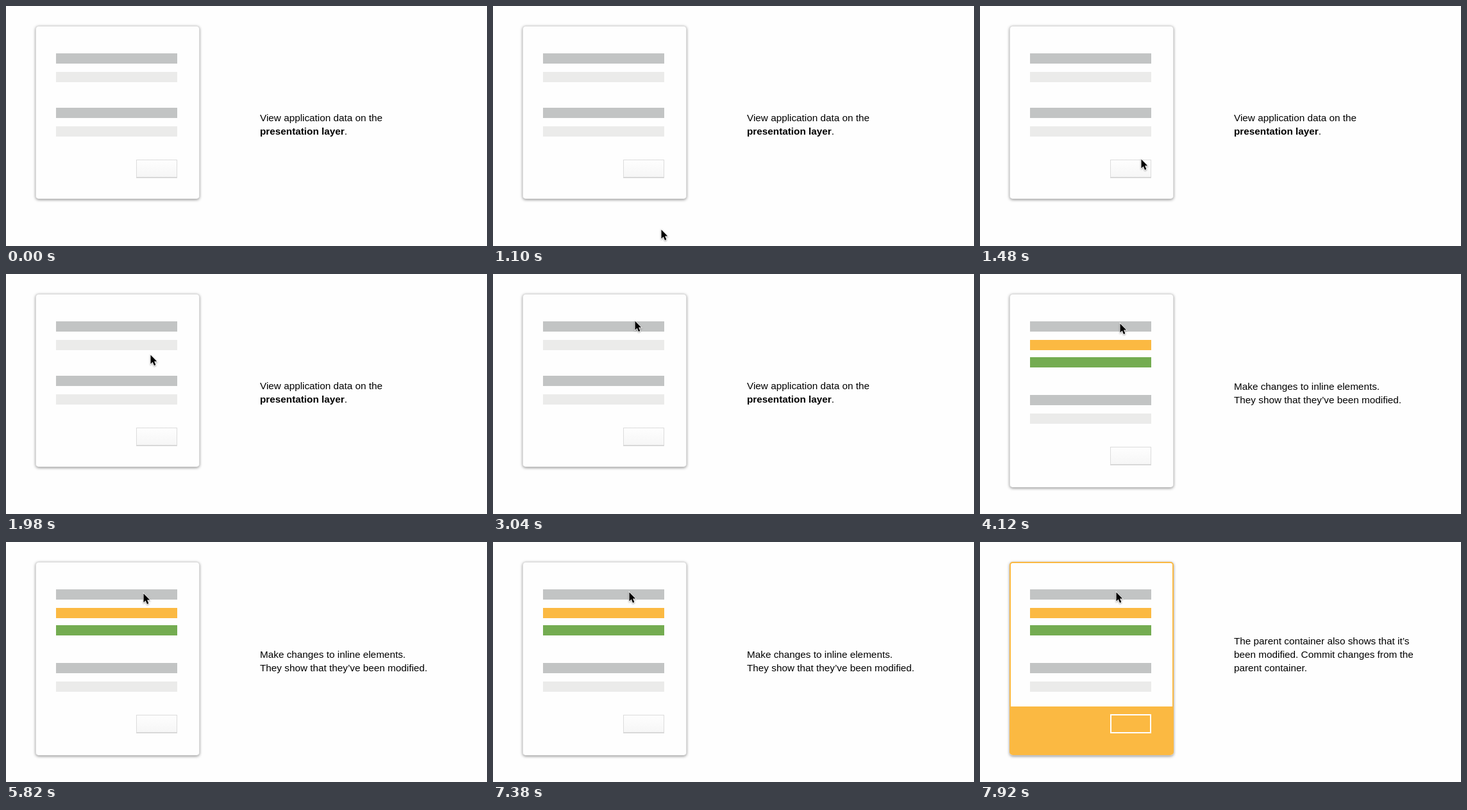
Write an HTML page that moves like this. It is 750 px wide and 375 px high and loops after 8000 ms.

```html
<!DOCTYPE html>
<html lang="en">
<head>
<meta charset="utf-8">
<title>Inline editing</title>
<style>
  html, body { margin: 0; width: 100%; height: 100%; overflow: hidden; background: #fefefe; }
  div, p, svg { position: absolute; box-sizing: border-box; margin: 0; }
  #card {
    left: 46px; top: 31px; width: 256px; border-radius: 5px; background: #fefefe;
    border: 1px solid #dcdcdc; border-bottom-color: #c4c4c4;
    box-shadow: 0 1px 4px rgba(0, 0, 0, .42);
  }
  .bar { left: 78px; width: 189px; height: 16px; background: #c2c4c4; }
  .pale { background: #ebebea; }
  #field, #added { top: 103px; }
  #added { top: 130px; background: #74ac51; }
  #button {
    left: 203px; width: 64px; height: 29px;
    border: 1px solid #dcdcdc; border-bottom: 2px solid #d8d8d8;
    background: linear-gradient(#fefefe, #f6f6f6);
  }
  #modified {
    left: 46px; top: 31px; width: 256px; height: 302px;
    border: 2px solid #fbb942; border-radius: 5px;
  }
  #footer { left: 0; right: 0; top: 224px; bottom: 0; background: #fbb942; }
  #commit { left: 155px; top: 12px; width: 64px; height: 30px; border: 2px solid #fefefe; }
  p { left: 396px; font: 15.3px/21px "Liberation Sans", Arial, sans-serif; color: #000; white-space: nowrap; }
  #cursor { left: 0; top: 0; overflow: visible; filter: drop-shadow(0 1px 1px rgba(0, 0, 0, .35)); }
</style>
</head>
<body>
<div id="card"></div>
<div class="bar" style="top:74px"></div>
<div class="bar pale" id="field"></div>
<div class="bar" id="added"></div>
<div class="bar pale" id="field2"></div>
<div class="bar" id="label2"></div>
<div id="button"></div>
<div id="modified"><div id="footer"><div id="commit"></div></div></div>
<p style="top:164px">View application data on the<br><b>presentation layer</b>.</p>
<p style="top:165px">Make changes to inline elements.<br>They show that they’ve been modified.</p>
<p style="top:144px">The parent container also shows that it’s<br>been modified. Commit changes from the<br>parent container.</p>
<svg id="cursor" width="14" height="20">
  <path d="M.5 .5V14.5L3.7 11.5L6 17L8.4 16L6.1 10.6H10.3Z" stroke="#fff" stroke-width="1.6" paint-order="stroke"/>
</svg>
<script>
const LOOP = 8000, EDIT = 3550, COMMIT = 7530, SETTLE = 2280;
const $ = id => document.getElementById(id);
const texts = document.querySelectorAll('p');

// Pointer stops: time, x, y. It glides until SETTLE, then drifts in whole pixels.
const stops = [
  [1000, 265, 378], [1480, 251, 239], [1820, 228, 159], [1980, 225, 126], [SETTLE, 222, 69],
  [2550, 222, 70], [2620, 222, 71], [2920, 221, 73], [3140, 221, 74], [3320, 220, 75],
  [3360, 220, 76], [4080, 219, 77], [4120, 218, 77], [4540, 218, 79], [4820, 217, 79],
  [4980, 216, 80], [5160, 215, 80], [5820, 214, 80], [6240, 213, 80], [6400, 213, 79],
  [6720, 212, 79], [7380, 212, 78]
];

function pointer(t) {
  const next = stops.findIndex(s => s[0] > t);
  if (next === 0) return [265, 400];
  const [t0, x, y] = stops.at(next < 0 ? -1 : next - 1);
  if (t >= SETTLE) return [x, y];
  const [t1, x1, y1] = stops[next];
  const k = (t - t0) / (t1 - t0);
  return [x + (x1 - x) * k, y + (y1 - y) * k].map(Math.round);
}

// Ease-out progress of a change.
function ease(t, start, length) {
  const u = Math.min(1, Math.max(0, (t - start) / length));
  return 1 - (1 - u) ** 2;
}

const mix = (a, b, k) => a + (b - a) * k;

function draw(t) {
  const edited = t >= EDIT;
  const k = ease(t, EDIT, 370);
  texts.forEach((p, i) => p.hidden = i !== edited + (t >= COMMIT));

  $('card').style.height = Math.round(mix(271, 303, k)) + 'px';
  $('field').style.background =
    `rgb(${mix(235, 251, k)}, ${mix(235, 185, k)}, ${mix(234, 66, k)})`;
  $('added').hidden = !edited;
  $('label2').style.top = (edited ? 189 : 159) + 'px';
  $('field2').style.top = Math.round(mix(188, 218, k)) + 'px';
  $('field2').style.opacity = edited ? k : 1;
  $('button').style.top = Math.round(mix(240, 270, k)) + 'px';
  $('modified').style.opacity = ease(t, COMMIT, 390);

  const [x, y] = pointer(t);
  $('cursor').style.transform = `translate(${x}px, ${y}px)`;
}

const start = performance.now();
function tick() {
  draw((performance.now() - start) % LOOP);
  requestAnimationFrame(tick);
}
tick();
</script>
</body>
</html>
```
